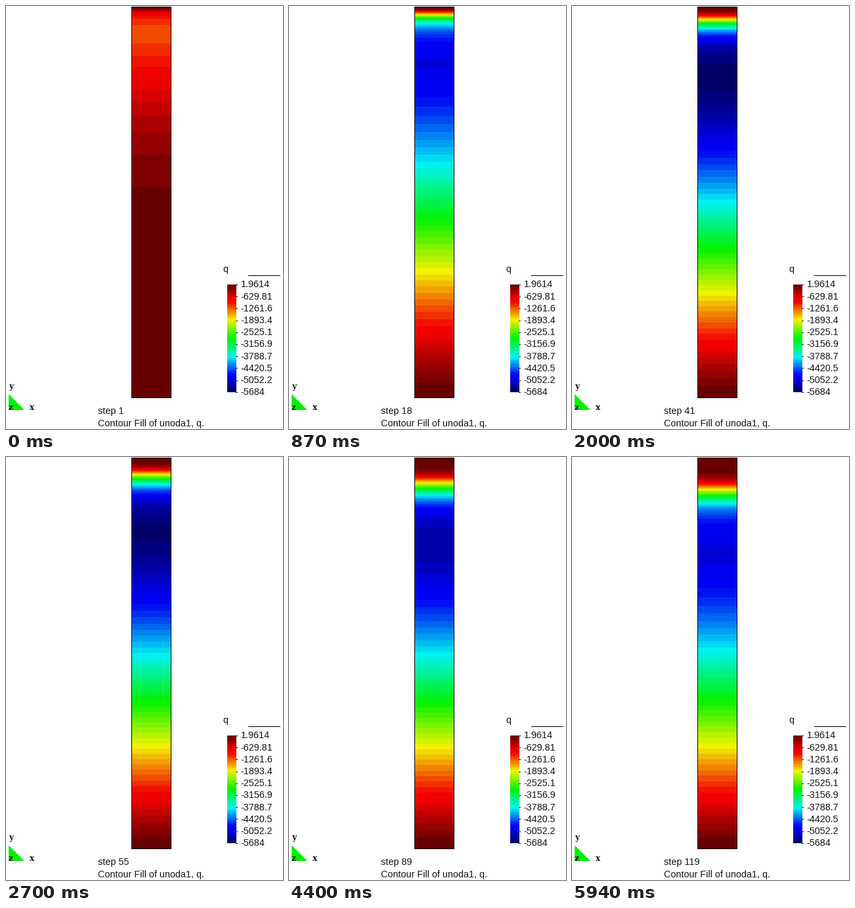
Write a matplotlib script that moves like this. It is 422 by 644 pixels and loops after 5970 ms.

```python
import colorsys

import numpy as np
import matplotlib.pyplot as plt
from matplotlib.animation import FuncAnimation
from matplotlib.patches import Polygon, Rectangle

W, H, DPI = 422, 644, 64
PX = 72 / DPI
FRAMES, INTERVAL = 199, 30
STEP_MS, LAST_STEP = 50, 119
LEVELS = 50
Q_MAX, Q_MIN = 1.9614, -5684
INK = "#141414"

TOP, BOTTOM = 2, 596
ROWS = np.arange(TOP - 1, BOTTOM + 1) + 0.5

# Key steps: size of the peak, its depth, and the depth of the front.
KEYS = [1, 10, 27, 41, 69, 119]
PEAK = [0.212, 0.77, 0.984, 0.997, 0.981, 0.886]
PEAK_DEPTH = [38, 76, 92, 104, 118, 148]
FRONT_DEPTH = [8, 11.5, 18.5, 25, 38, 54]


def level_color(u):
    """Dark red, a hue sweep from red to blue, then dark blue."""
    hue = np.clip((u - 0.15) / 0.7, 0, 1) * 2 / 3
    edge = min(u, 1 - u) / 0.125
    return colorsys.hsv_to_rgb(hue, 1, 0.41 + 0.54 * min(edge, 1))


PALETTE = np.array([level_color(k / (LEVELS - 1)) for k in range(LEVELS)])


def at_step(step, values):
    """Diffusion runs with the square root of time."""
    return np.interp(np.sqrt(step), np.sqrt(KEYS), values)


def profile(step):
    """Sigmoid front down to the peak, then a smooth decay to the bottom."""
    depth = np.clip(ROWS - TOP, 0, BOTTOM - TOP)
    top = at_step(step, PEAK_DEPTH)
    front = at_step(step, FRONT_DEPTH)
    steep = 1.5 + 0.025 * step

    def sigmoid(d):
        return d ** steep / (d ** steep + front ** steep)

    z = np.clip((BOTTOM - TOP - depth) / (BOTTOM - TOP - top), 0, 1)
    decay = 1 - (1 - z ** (1.25 + 3.75 * step ** -1.25)) ** 1.5
    rise = sigmoid(depth) / sigmoid(top)
    return at_step(step, PEAK) * np.where(depth < top, rise, decay)


def column(step):
    k = np.clip((profile(step) * LEVELS).astype(int), 0, LEVELS - 1)
    return PALETTE[k][:, None, :]


def label(x, y, text, size=14.4, **kw):
    kw = {"family": "Liberation Sans", "color": INK, **kw}
    return ax.text(x, y, text, fontsize=size * PX, va="baseline", **kw)


def line(x0, x1, y):
    ax.plot([x0, x1], [y, y], color="black", lw=PX,
            solid_capstyle="butt", snap=False)


def strip(rgb, x0, x1, y0, y1):
    return ax.imshow(rgb, extent=(x0, x1, y1, y0), aspect="auto",
                     interpolation="nearest")


fig = plt.figure(figsize=(W / DPI, H / DPI), dpi=DPI, facecolor="white")
ax = fig.add_axes([0, 0, 1, 1])

bar = strip(column(1), 191, 252, TOP - 1, BOTTOM + 1)
ax.add_patch(Rectangle((191.5, TOP - 0.5), 60, BOTTOM - TOP + 1, fill=False,
                       ec="black", lw=PX, snap=False))

# Legend
strip(PALETTE[:, None, :], 337, 351, 424, 588)
label(330, 405, "q")
line(369, 418, 410.5)
for n, q in enumerate(np.linspace(Q_MAX, Q_MIN, 10)):
    y = 424 + n * 18.2
    line(350, 353, round(y) + 0.5)
    label(357.5, y + 4.3, f"{q:.5g}")

# Axis triad
ax.add_patch(Polygon([(4, 591), (4, 615), (28, 615)], fc="#00f000", lw=0))
for x, y, name in [(4, 583, "y"), (4, 615, "z"), (35.5, 615, "x")]:
    label(x, y, name, 12, family="DejaVu Serif", weight="bold")

caption = label(140, 621, "step 1")
label(140, 640, "Contour Fill of unoda1, q.")

ax.set_xlim(0, W)
ax.set_ylim(H, 0)
ax.axis("off")


def update(i):
    step = min(int((i * INTERVAL + 20) // STEP_MS) + 1, LAST_STEP)
    bar.set_data(column(step))
    caption.set_text(f"step {step}")
    return bar, caption


anim = FuncAnimation(fig, update, frames=FRAMES, interval=INTERVAL,
                     repeat=True, repeat_delay=0)
plt.show()
```
